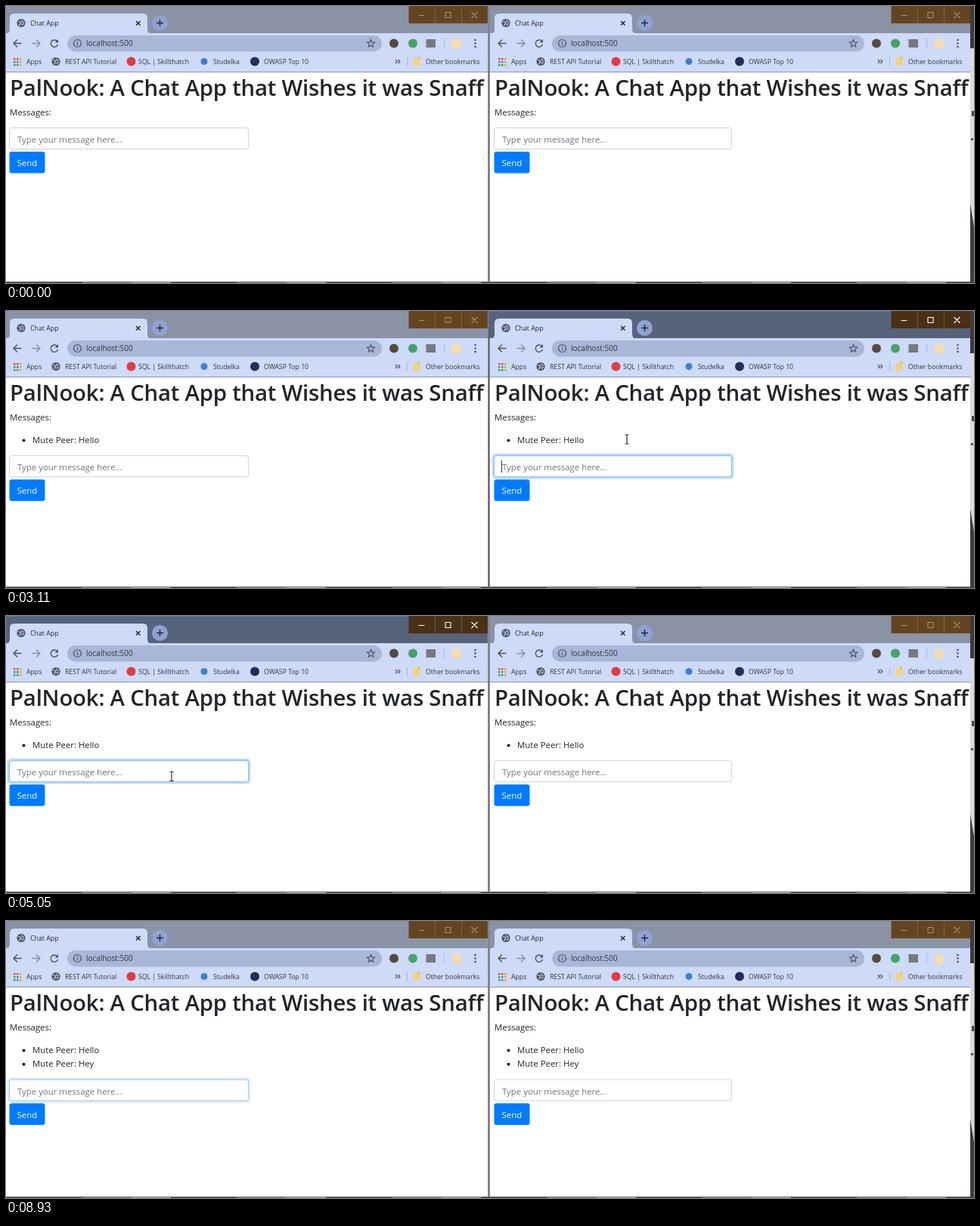
An HTML page that plays this animation: 1280x367 px, repeating every 9010 ms.

```html
<!DOCTYPE html>
<html lang="en">
<head>
<meta charset="utf-8">
<title>Chat App</title>
<style>
html, body { margin: 0; width: 100%; height: 100%; overflow: hidden; background: #3b3531; }
svg { display: block; font-family: "Open Sans", "Noto Sans", sans-serif; }
text { white-space: pre; }
.tab { font-size: 8.8px; fill: #26282c; }
.mark { font-size: 8.7px; fill: #33363c; }
.url { font-size: 10px; fill: #33363d; }
.head { font-size: 29.4px; font-weight: 600; letter-spacing: -.24px; fill: #212529; }
.body { font-size: 11.4px; fill: #212529; }
.line { fill: none; stroke: #4b5261; stroke-width: 1.4; }
</style>
</head>
<body>
<svg id="stage" width="1280" height="367" viewBox="0 0 1280 367"></svg>
<script>
const LOOP = 9010, STEP = 76.5;
const SWITCH = 4517;
const stage = document.getElementById('stage');

const rect = (x, y, w, h, fill, extra = '') =>
  `<rect x="${x}" y="${y}" width="${w}" height="${h}" fill="${fill}" ${extra}/>`;
const dot = (x, y, r, fill) => `<circle cx="${x}" cy="${y}" r="${r}" fill="${fill}"/>`;
const line = (d, extra = '') => `<path class="line" d="${d}" ${extra}/>`;
const text = (cls, x, y, s, extra = '') => `<text class="${cls}" x="${x}" y="${y}" ${extra}>${s}</text>`;

const globe = (x, y) => dot(x, y, 5.6, '#50555f') +
  `<path d="M${x - 4} ${y - 2}l3 1 1 2-2 1 0 2M${x + 1} ${y - 4}l0 2 3 1M${x + 1} ${y + 3}l2-2 1 0" fill="none" stroke="#cddaf8" stroke-width="1.1"/>`;

function appGrid() {
  const colors = ['#e5493a', '#e5493a', '#e0a91f', '#3d9c55', '#4a7fe0', '#e0a91f', '#3d9c55', '#3d9c55', '#e0a91f'];
  return colors.map((c, i) => rect(10 + i % 3 * 4, 69 + Math.floor(i / 3) * 4, 2.5, 2.5, c)).join('');
}

function desktop() {
  let s = rect(0, 0, 1280, 367, '#443d3a');
  for (let i = 0; i < 7; i++) {
    s += rect(100 + i * 205, 366, 66, 1, '#8b8483') + rect(166 + i * 205, 366, 52, 1, '#bdb4b3');
  }
  s += rect(0, 365, 1275, 1, '#77777a') + rect(1275, 0, 5, 56, '#3e3b3c');
  s += '<path d="M1275 56h5V292L1275 262z" fill="#d9d9de"/>';
  s += rect(1277, 139, 3, 7, '#45454a') + rect(1276, 175, 3, 3, '#55555a');
  return s + rect(637, 0, 3, 365, '#8e9096');
}

function leftChrome() {
  return '<path d="M0 36.500Q5 36 5 31V16Q5 10 11 10H181Q187 10 187 16V31Q187 36 192 36.500Z" fill="#cddaf8"/>' +
    globe(20, 22.5) + text('tab', 32, 26, 'Chat App') +
    line('M172 20l5.500 5.500M177.500 20l-5.500 5.500', 'style="stroke:#222"') +
    dot(203.5, 22.5, 10.5, '#8fa2d2') + line('M199 22.500h9M203.500 18v9', 'style="stroke:#25282f"') +
    line('M20.500 49.500h-10M15 44.500l-5 5 5 5') +
    line('M34.500 49.500h10M40 44.500l5 5-5 5', 'opacity=".55"') +
    line('M67.500 46.500A4.700 4.700 0 1 0 68.500 51') +
    '<path d="M69 44v4.500h-4.500z" fill="#4b5261"/>';
}

function urlBar(w) {
  return rect(81, 39, w - 221, 21.5, '#a8b6d7', 'rx="10.7"') +
    line('M94.500 44.500a5 5 0 1 0 .01 0M94.500 46.500v1.200M94.500 48.700v3.500', 'style="stroke-width:1.2"') +
    text('url', 106, 53, 'localhost:500');
}

function bookmarks() {
  return appGrid() + text('mark', 27, 77, 'Apps') +
    globe(66, 73.5) + text('mark', 78, 77, 'REST API Tutorial') +
    dot(165.5, 73.5, 6, '#e23b40') + text('mark', 175, 77, 'SQL | Skillthatch') +
    dot(262, 73.5, 4.5, '#3d7fd6') + text('mark', 274, 77, 'Studelka') +
    dot(329, 73.5, 6, '#242d55') + text('mark', 341, 77, 'OWASP Top 10');
}

// Right-aligned parts, placed for a window 637 px wide
function rightChrome(id) {
  return `<g id="buttons${id}">${rect(532.5, 0, 104.5, 23, 'currentColor')}` +
    '<path d="M567.500 0v23M602.500 0v23" stroke="#8d7452" stroke-opacity=".6"/>' +
    `<path id="glyphs${id}" d="M545.500 12.500h8M581 8.500h7v7h-7zM615.500 8l8 8M623.500 8l-8 8" fill="none" stroke-width="1.1"/></g>` +
    line('M482.500 44.500l1.400 3.400 3.600.300-2.700 2.400.800 3.500-3.100-1.900-3.100 1.900.800-3.500-2.700-2.400 3.600-.300z', 'style="stroke-width:1.1"') +
    dot(513, 49.5, 6, '#544b3f') + dot(538, 49.5, 6, '#44a463') +
    rect(555.5, 44, 12.5, 11, '#777980') + rect(579, 43, 1, 13, '#aab7d6') +
    dot(596, 50, 7, '#f4dcae') +
    [45, 49.5, 54].map(y => dot(620.5, y, 1.3, '#4b5261')).join('') +
    line('M515 71l2.500 2.500-2.500 2.500M518.500 71l2.500 2.500-2.500 2.500', 'style="stroke-width:1.1"') +
    rect(530, 68, 1, 12, '#aab7d6') +
    rect(538.5, 69, 9, 10, '#f5d377', 'rx="1"') + rect(544, 67.5, 3.5, 3, '#e9bd52') +
    text('mark', 555, 77, 'Other bookmarks');
}

function page(id, field) {
  const item = (n, y, s) => `<g id="item${id}${n}">${dot(23.5, y - 3.5, 2.1, '#212529')}${text('body', 35, y, s)}</g>`;
  return text('head', 5, 118.5, 'PalNook: A Chat App that Wishes it was Snaff') +
    text('body', 5, 144.5, 'Messages:') +
    item(1, 175, 'Mute Peer: Hello') + item(2, 193.3, 'Mute Peer: Hey') +
    `<g id="form${id}">` +
    rect(2.8, 159.8, field + 3.4, 31.4, 'none', `id="glow${id}" rx="4" stroke="#007bff" stroke-opacity=".27" stroke-width="2.4"`) +
    rect(4.5, 161.5, field, 28, '#fff', 'rx="3" stroke="#ced4da"') +
    rect(4.5, 161.5, field, 28, 'none', `id="edge${id}" rx="3" stroke="#80bdff"`) +
    text('body', 15, 181, '', `id="value${id}"`) +
    rect(14, 168, 1, 16, '#333', `id="caret${id}"`) +
    rect(4.5, 193, 47, 28.6, '#007bff', 'rx="3"') +
    text('body', 14.5, 212, 'Send', 'style="fill:#fff"') + '</g>';
}

function browser(id, x, w, field) {
  return `<g transform="translate(${x})">` +
    rect(-1, 0, w + 1, 365, '#fff') + rect(-2, 0, w + 2, 36, '#8a92a6', `id="bar${id}"`) +
    rect(-2, 0, w + 2, 1, '#3f7fc0', `id="top${id}"`) +
    rect(-1, 36, w + 1, 51, '#cddaf8') + rect(-1, 87, w + 1, 1, '#8d96ab') +
    leftChrome() + urlBar(w) + bookmarks() +
    `<g transform="translate(${w - 637})">${rightChrome(id)}</g>` + page(id, field) +
    rect(-3, 0, 1, 365, '#55585f', `id="side${id}"`) + '</g>';
}

stage.innerHTML = desktop() + browser('L', 0, 637, 316) + browser('R', 641, 634, 314) +
  '<circle id="click" r="9" fill="#fff45c"/>' +
  '<path id="beam" d="M-2.500-6h2l.500.500.500-.500h2M0-5.500V5.500M-2.500 6h2l.500-.500.500.500h2" fill="none" stroke="#222" stroke-width="1.1"/>' +
  '<path id="arrow" d="M0 0V13.500l3-2.800 2 4.800 2.300-1-2-4.600h4.200z" fill="#fff" stroke="#111" stroke-width=".9"/>';

const $ = id => document.getElementById(id);
const show = (node, on) => node.setAttribute('visibility', on ? 'visible' : 'hidden');
const clamp = v => Math.max(0, Math.min(1, v));
const within = (t, [a, b]) => t >= a && t < b;

// [time, text] pairs per window
const typed = {
  R: [[1780, 'H'], [2010, 'He'], [2330, 'Hel'], [2400, 'Hell'], [2720, 'Hello'], [3040, '']],
  L: [[5360, 'H'], [5520, 'He'], [5680, 'Hey'], [6000, '']]
};
const arrivals = { R: [3040, 6070], L: [3110, 6000] };
const active = { R: [850, SWITCH], L: [SWITCH, 8930] };
const caretOff = [[1380, 1780], [3510, 3980], [5050, 5360], [6530, 7000], [7540, 8080], [8630, 8930]];

const ramp = (t, start) => clamp(Math.floor((t - start + 1) / 75) / 2);
function focusLevel(id, t) {
  if (id === 'R') return t < SWITCH ? ramp(t, 850) : 1 - ramp(t, SWITCH);
  return t < 8930 ? ramp(t, SWITCH) : .5;
}

function updateWindow(id, t) {
  const on = within(t, active[id]);
  $('bar' + id).setAttribute('fill', on ? '#56637b' : '#8a92a6');
  show($('top' + id), on);
  $('side' + id).setAttribute('opacity', on ? 1 : .45);
  $('buttons' + id).setAttribute('color', on ? '#493017' : '#654521');
  $('glyphs' + id).setAttribute('stroke', on ? '#fff' : '#a58f72');

  const count = arrivals[id].filter(a => t >= a).length;
  show($('item' + id + 1), count > 0);
  show($('item' + id + 2), count > 1);
  $('form' + id).setAttribute('transform', `translate(0 ${[0, 30.2, 48.6][count]})`);

  const level = focusLevel(id, t);
  $('glow' + id).setAttribute('opacity', level);
  $('edge' + id).setAttribute('opacity', level);

  const value = typed[id].reduce((s, [at, str]) => t >= at ? str : s, '');
  const field = $('value' + id);
  field.textContent = value || 'Type your message here...';
  field.style.fill = value ? '#495057' : '#6c757d';
  const caret = $('caret' + id);
  caret.setAttribute('x', value ? Math.round(15 + field.getComputedTextLength()) : 14);
  show(caret, on && !caretOff.some(span => within(t, span)));
}

const mix = (a, b, p) => [a[0] + (b[0] - a[0]) * p, a[1] + (b[1] - a[1]) * p];
const stepsSince = (t, start) => Math.floor((t - start) / STEP + .02);
const ease = p => p * p * (3 - 2 * p);
const ENTRY = [1192, 352], RIGHT = [821, 170], LEFT = [219, 212.5], EXIT = [1062, 336];

function pointer(t) {
  if (t < 150) return null;
  if (t < 3980) {
    const p = clamp(stepsSince(t, 150) / 7);
    return { at: mix(ENTRY, RIGHT, 1 - (1 - p) ** 2), beam: p > .95 };
  }
  if (t < 7000) {
    const p = clamp((stepsSince(t, 3980) + 1) / 7);
    return { at: mix(RIGHT, LEFT, ease(p)), beam: p > .95 };
  }
  const n = stepsSince(t, 7000);
  return n > 10 ? null : { at: mix(LEFT, EXIT, ((n + 1) / 11) ** 1.6), beam: n < 1 };
}

function updatePointer(t) {
  const p = pointer(t);
  show($('beam'), p && p.beam);
  show($('arrow'), p && !p.beam);
  show($('click'), within(t, [850, 925]) || within(t, [SWITCH, SWITCH + 76]));
  if (!p) return;
  const move = `translate(${p.at.map(v => v.toFixed(1)).join(' ')})`;
  for (const id of ['beam', 'arrow', 'click']) $(id).setAttribute('transform', move);
}

function draw(now) {
  const t = now % LOOP;
  updateWindow('L', t);
  updateWindow('R', t);
  updatePointer(t);
}

let start;
function frame(now) {
  start ??= now;
  draw(now - start);
  requestAnimationFrame(frame);
}
draw(0);
requestAnimationFrame(frame);
</script>
</body>
</html>
```
